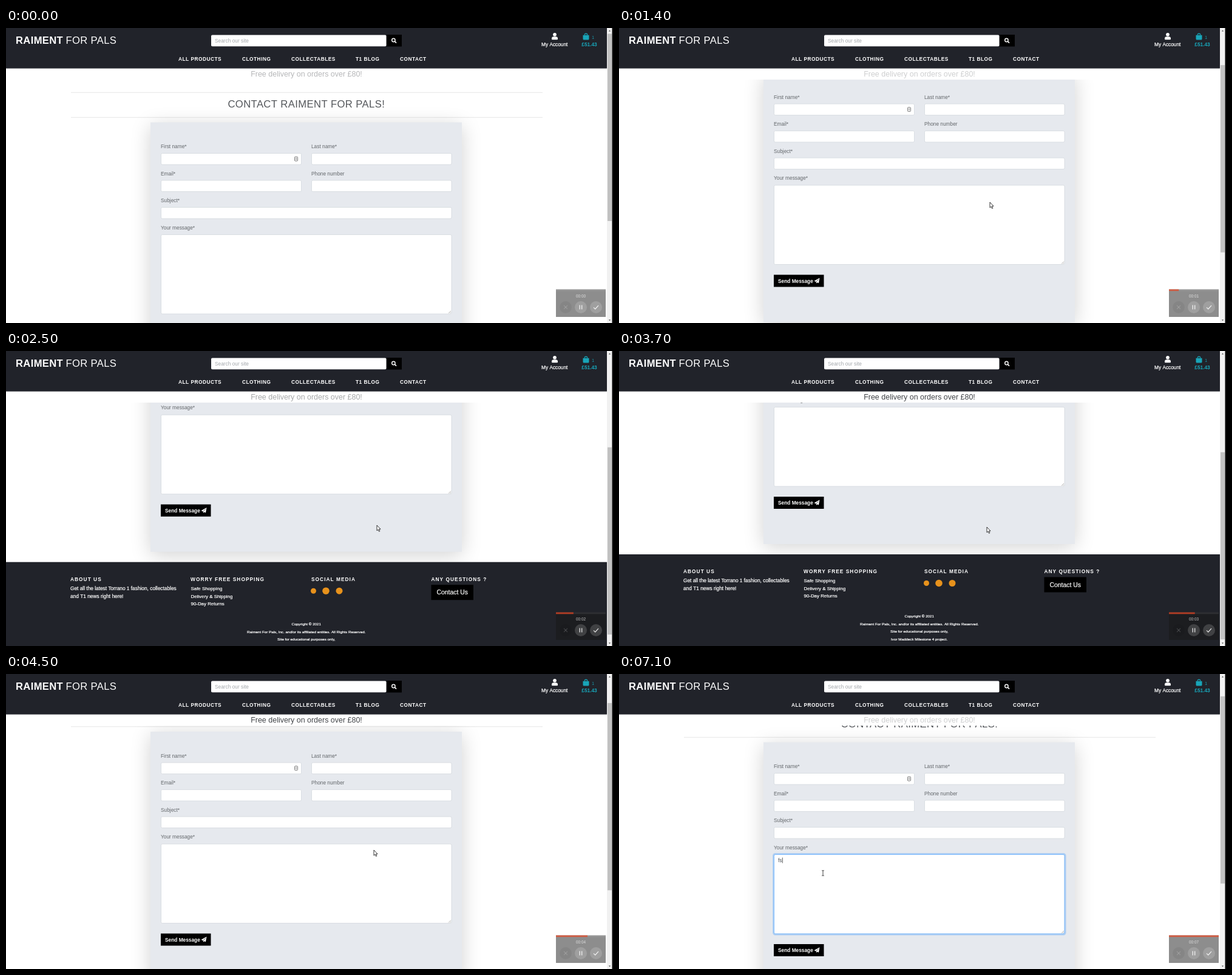
Write an HTML page with a canvas that moves like this. It is 1000 px wide and 486 px high and loops after 7200 ms.

```html
<!DOCTYPE html>
<html lang="en">
<head>
<meta charset="utf-8">
<title>Contact form</title>
<style>
  html, body { margin: 0; width: 100%; height: 100%; overflow: hidden; background: #fff; }
  canvas { display: block; width: 1000px; height: 486px; }
</style>
</head>
<body>
<canvas id="stage"></canvas>
<script>
const W = 1000, H = 486, LOOP = 7200, STEP = 100;
const PAGE_W = 990;
const DARK = '#21232a', TEAL = '#18a5b8', ORANGE = '#e8921c';
const FONT = '"Liberation Sans", Arial, sans-serif';
const BODY = 8.32;

const canvas = document.getElementById('stage');
const dpr = window.devicePixelRatio || 1;
canvas.width = W * dpr;
canvas.height = H * dpr;
const ctx = canvas.getContext('2d');

// Wheel notches: [start in seconds, direction]
const NOTCHES = [[1.063, 1], [1.26, 1], [1.46, 1], [1.967, 1], [2.34, 1],
                 [3.72, -1], [3.92, -1], [4.12, -1], [4.348, -1]];
const NOTCH = 51.25, MAX_SCROLL = 248;

// [seconds, opacity]
const FADE = [[0, .33], [1.1, .2], [2, .28], [3.7, .85], [4.5, .85], [5.8, .7], [7.1, .22]];
// [seconds, x, y]
const POINTER = [[.2, 300, 480], [.8, 611, 287], [2.6, 611, 287], [3.1, 606, 290], [4.9, 606, 290],
                 [5.4, 296, 342], [5.8, 403, 334.5], [6.2, 336, 328]];

const smooth = p => p * p * (3 - 2 * p);
const clamp = (v, lo, hi) => Math.min(hi, Math.max(lo, v));

function sample(keys, t) {
  let i = 0;
  while (i < keys.length - 2 && t >= keys[i + 1][0]) i++;
  const a = keys[i], b = keys[i + 1];
  const p = smooth(clamp((t - a[0]) / (b[0] - a[0]), 0, 1));
  return a.slice(1).map((v, k) => v + (b[k + 1] - v) * p);
}

function scrollAt(t) {
  let y = 0;
  for (const [start, dir] of NOTCHES) {
    const d = dir > 0 ? Math.min(NOTCH, MAX_SCROLL - y) : -NOTCH;
    y += d * smooth(clamp((t - start) / .25, 0, 1));
  }
  return y;
}

// heft thickens the strokes of small light type
function text(s, x, y, color, { size = BODY, bold = false, gap = 0, align = 'left', heft = 0 } = {}) {
  ctx.font = `${bold ? 'bold ' : ''}${size}px ${FONT}`;
  ctx.letterSpacing = gap + 'px';
  ctx.textAlign = align;
  ctx.fillStyle = color;
  ctx.fillText(s, x, y);
  if (heft) {
    ctx.strokeStyle = color;
    ctx.lineWidth = heft;
    ctx.strokeText(s, x, y);
  }
}

function rect(x, y, w, h, color) {
  ctx.fillStyle = color;
  ctx.fillRect(x, y, w, h);
}

function disc(x, y, r, color) {
  ctx.fillStyle = color;
  ctx.beginPath();
  ctx.arc(x, y, r, 0, 7);
  ctx.fill();
}

function round(x, y, w, h, r, fill, stroke, line = 1) {
  ctx.beginPath();
  ctx.roundRect(x, y, w, h, r);
  if (fill) { ctx.fillStyle = fill; ctx.fill(); }
  if (stroke) { ctx.strokeStyle = stroke; ctx.lineWidth = line; ctx.stroke(); }
}

function poly(points, fill, stroke, line = 1) {
  ctx.beginPath();
  points.forEach(([x, y], i) => i ? ctx.lineTo(x, y) : ctx.moveTo(x, y));
  if (fill) { ctx.closePath(); ctx.fillStyle = fill; ctx.fill(); }
  if (stroke) { ctx.strokeStyle = stroke; ctx.lineWidth = line; ctx.stroke(); }
}

function field(x, y, w, h) {
  round(x + .5, y + .5, w - 1, h - 1, 2, '#fff', '#d3d8de', .8);
}

function plane(x, y) {
  poly([[x, y + 5], [x + 9, y], [x + 7.5, y + 8.5], [x + 4.8, y + 7.3],
        [x + 3.6, y + 9], [x + 3.2, y + 6.5]], '#fff');
  poly([[x + 3.2, y + 6.5], [x + 7.4, y + 2.2]], null, '#000', .7);
}

function drawForm(t) {
  ctx.save();
  ctx.shadowColor = 'rgba(0,0,0,.18)';
  ctx.shadowBlur = 31 * dpr;
  ctx.shadowOffsetY = 5 * dpr;
  rect(238, 155.5, 513, 410.5, '#e6e9ee');
  ctx.restore();

  [['First name*', 255, 198], ['Last name*', 503, 198], ['Email*', 255, 242.5],
   ['Phone number', 503, 242.5], ['Subject*', 255, 287], ['Your message*', 255, 331.5]]
    .forEach(([s, x, y]) => text(s, x, y, '#63676b'));
  for (const y of [206, 250.5]) {
    field(255, y, 232, 19.5);
    field(503, y, 231.5, 19.5);
  }
  field(255, 295, 479.5, 19.5);
  field(255, 340, 479.5, 131.5);

  // autofill badge
  round(475.5, 212.2, 5, 6.8, 1, '#fff', '#777', 1);
  rect(477, 214, 2, 1, '#777');
  rect(477, 216, 2, 1, '#777');

  const focus = clamp((t - 6.3) / .2, 0, 1);
  if (focus) {
    ctx.globalAlpha = focus;
    round(254.3, 339.3, 481, 133, 3, null, 'rgba(0,123,255,.25)', 2.4);
    round(255.5, 340.5, 478.5, 130.5, 2, null, '#80bdff', 1);
    ctx.globalAlpha = 1;
    const typed = 'fs'.slice(0, t < 6.8 ? 0 : t < 7 ? 1 : 2);
    text(typed, 262, 353, '#495057');
    rect(262.4 + ctx.measureText(typed).width, 345.5, .8, 9, '#333');
  }
  poly([[729, 470], [733, 466]], null, '#999', .7);
  poly([[731.3, 470], [733, 468.3]], null, '#999', .7);

  rect(255, 488, 82.5, 20, '#000');
  text('Send Message', 262, 501, '#fff', { bold: true });
  plane(321.5, 493.3);
}

function drawFooter() {
  rect(0, 583, PAGE_W, 200, DARK);
  const head = { bold: true, gap: 1.04 };
  [['ABOUT US', 106], ['WORRY FREE SHOPPING', 304], ['SOCIAL MEDIA', 503], ['ANY QUESTIONS ?', 700.5]]
    .forEach(([s, x]) => text(s, x, 614, '#fff', head));
  const heft = .22;
  text('Get all the latest Torrano 1 fashion, collectables', 106, 629.3, '#fff', { heft });
  text('and T1 news right here!', 106, 641.8, '#fff', { heft });
  ['Safe Shopping', 'Delivery & Shipping', '90-Day Returns']
    .forEach((s, i) => text(s, 304.5, 629.3 + i * 12.5, '#fff', { size: 7.9, heft }));

  disc(506.5, 630.5, 4.5, ORANGE);
  disc(527, 630.5, 5.8, ORANGE);
  disc(549, 630.5, 5.5, ORANGE);

  rect(700.5, 620.5, 69.5, 25, '#000');
  text('Contact Us', 735.2, 636.5, '#fff', { size: 10.4, align: 'center', heft });

  ['Copyright © 2021',
   'Raiment For Pals, Inc. and/or its affiliated entities. All Rights Reserved.',
   'Site for educational purposes only,',
   'Ivor Maddeck Milestone 4 project.']
    .forEach((s, i) => text(s, 494.7, 687.3 + i * 12.5, '#fff', { size: 6.24, align: 'center', heft }));
}

function drawPage(t, scroll) {
  ctx.save();
  ctx.beginPath();
  ctx.rect(0, 85, PAGE_W, H - 85);
  ctx.clip();
  ctx.translate(0, -scroll);
  rect(107, 105.8, 777, .9, '#e3e3e3');
  rect(107, 146.8, 777, .9, '#e3e3e3');
  text('CONTACT RAIMENT FOR PALS!', 494.8, 130.5, '#53565a', { size: 16.64, gap: .4, align: 'center' });
  drawForm(t);
  drawFooter();
  ctx.restore();
}

function drawHeader(t) {
  rect(0, 67, PAGE_W, 18, '#fff');
  ctx.globalAlpha = sample(FADE, t)[0];
  text('Free delivery on orders over £80!', 495, 80, '#212529', { size: 12.48, align: 'center' });
  ctx.globalAlpha = 1;

  ctx.save();
  ctx.shadowColor = 'rgba(0,0,0,.2)';
  ctx.shadowBlur = 2 * dpr;
  rect(0, 0, PAGE_W, 66.5, DARK);
  ctx.restore();

  const logo = { size: 16.6, gap: .36 };
  text('RAIMENT', 16, 26.3, '#fff', { ...logo, bold: true });
  text('FOR PALS', 98.5, 26.3, '#fff', logo);

  round(338, 11.5, 288.5, 18.7, 2, '#fff');
  text('Search our site', 344, 23.5, '#a3a7ab');
  rect(627, 11, 25, 19.5, '#000');
  ctx.beginPath();
  ctx.arc(638.4, 20, 2.7, 0, 7);
  ctx.strokeStyle = '#fff';
  ctx.lineWidth = 1.4;
  ctx.stroke();
  poly([[640.4, 22], [643, 24.6]], null, '#fff', 1.7);

  [['ALL PRODUCTS', 284], ['CLOTHING', 389], ['COLLECTABLES', 470], ['T1 BLOG', 576], ['CONTACT', 649]]
    .forEach(([s, x]) => text(s, x, 54.4, '#fff', { bold: true, gap: .5 }));

  disc(904, 10.8, 2.9, '#fff');
  round(899, 14.2, 10, 5, [3, 3, 1, 1], '#fff');
  text('My Account', 882, 29.8, '#fff', { heft: .22 });

  round(950.5, 11.8, 10, 7.6, [0, 0, 1.5, 1.5], TEAL);
  ctx.beginPath();
  ctx.arc(955.5, 11.5, 2.3, Math.PI, 0);
  ctx.strokeStyle = TEAL;
  ctx.lineWidth = 1.3;
  ctx.stroke();
  text('1', 965.3, 17.5, TEAL, { size: 6.6 });
  text('£51.43', 948.3, 29.8, TEAL, { bold: true });
}

function drawScrollbar(scroll) {
  rect(PAGE_W, 0, 8.5, H, '#f1f1f1');
  rect(991, 9.5 + scroll * .634, 7, 308.5, '#c1c1c1');
  poly([[992.8, 5.5], [996.2, 5.5], [994.5, 3.5]], '#555');
  poly([[992.8, 480.5], [996.2, 480.5], [994.5, 482.5]], '#555');
  rect(998.5, 0, 1.5, H, '#000');
}

function drawRecorder(t) {
  rect(906, 430.5, 82, 45.5, 'rgba(24,24,24,.49)');
  rect(906, 430.5, 82, 2.8, 'rgba(255,255,255,.08)');
  rect(906, 430.5, Math.min(82, t * 11.55), 2.8, 'rgba(232,66,30,.7)');
  const sec = Math.max(0, Math.floor(t - .03));
  text('00:0' + sec, 947, 444.3, 'rgba(255,255,255,.72)', { size: 6.4, align: 'center' });

  disc(922, 460, 10, 'rgba(0,0,0,.05)');
  disc(947, 460, 10, 'rgba(255,255,255,.16)');
  disc(972, 460, 10, 'rgba(255,255,255,.16)');
  const faint = 'rgba(255,255,255,.16)', glyph = 'rgba(255,255,255,.85)';
  poly([[919, 457], [925, 463]], null, faint, 1.1);
  poly([[925, 457], [919, 463]], null, faint, 1.1);
  rect(944.6, 456.5, 1.3, 7, glyph);
  rect(948, 456.5, 1.3, 7, glyph);
  poly([[968, 460.3], [970.7, 463], [976, 457.2]], null, glyph, 1.2);
}

function drawPointer(t) {
  if (t < .2) return;
  const [x, y] = sample(POINTER, t);
  if (t > 4.95) {
    poly([[x, y - 4], [x, y + 4]], null, '#444', 1);
    for (const d of [-4.2, 4.2]) poly([[x - 2, y + d], [x + 2, y + d]], null, '#444', .9);
    return;
  }
  const arrow = [[0, 0], [0, 9], [2, 7.2], [3.5, 10.4], [4.9, 9.7], [3.5, 6.7], [6, 6.4], [0, 0]]
    .map(([dx, dy]) => [x + dx, y + dy]);
  poly(arrow, '#fff', '#222', .9);
}

function draw(now) {
  const t = Math.floor(now % LOOP / STEP) * STEP / 1000;
  const scroll = scrollAt(t);
  ctx.setTransform(dpr, 0, 0, dpr, 0, 0);
  ctx.lineJoin = 'round';
  rect(0, 0, W, H, '#fff');
  drawPage(t, scroll);
  drawHeader(t);
  drawScrollbar(scroll);
  drawRecorder(t);
  drawPointer(t);
}

let begin;
function tick(now) {
  begin ??= now;
  draw(now - begin);
  requestAnimationFrame(tick);
}
draw(0);
requestAnimationFrame(tick);
</script>
</body>
</html>
```
